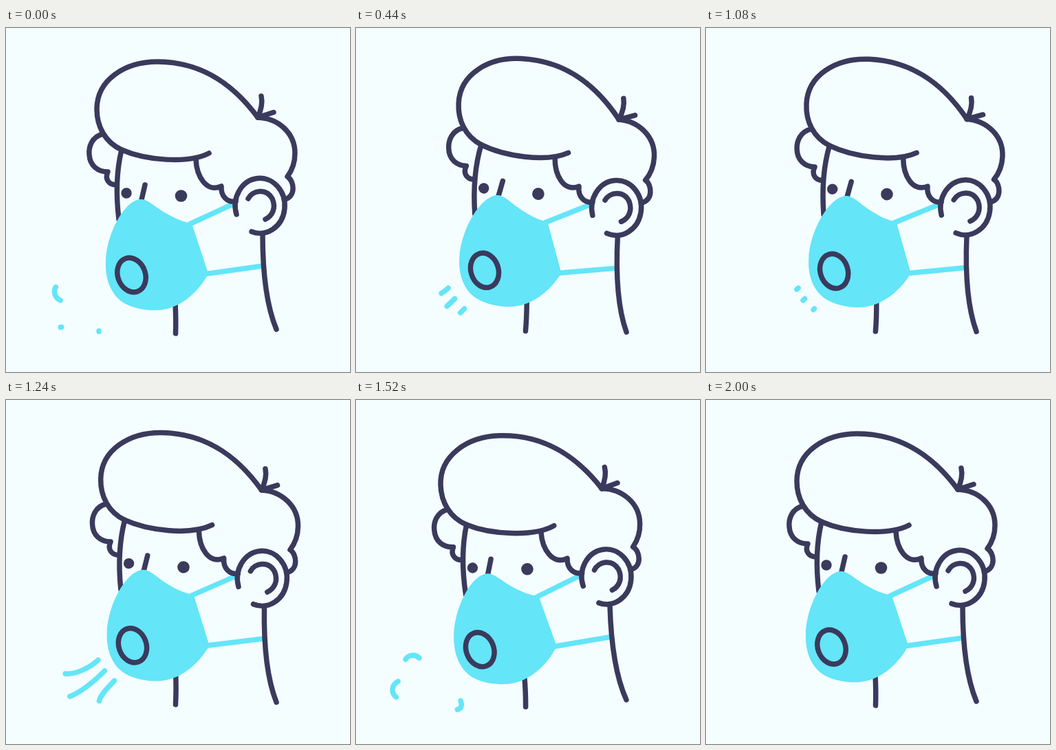
An HTML page that plays this animation: 500 px wide and 500 px high, repeating every 2680 ms.

```html
<!DOCTYPE html>
<html lang="en">
<head>
<meta charset="utf-8">
<title>Breathing in a mask</title>
<style>
  html, body { margin: 0; width: 100%; height: 100%; overflow: hidden; background: #f4fdff; }
  svg { display: block; width: 100%; height: 100%; }
  .ink, .cyan { fill: none; stroke: #3a3a5c; stroke-width: 7.5; stroke-linecap: round; stroke-linejoin: round; }
  .cyan { stroke: #64e5f8; }
</style>
</head>
<body>
<svg viewBox="0 0 500 500">
  <g id="head">
    <path class="cyan" d="M267 285L333 254.5M290 357.5L372 346"/>
    <g class="ink">
      <path d="M168 177C160 210 160 245 164 278"/>
      <path d="M202 228L196 254"/>
      <path d="M246 400C247 420 247 430 246.5 444"/>
      <path d="M373 300C373 350 378 402 393 438"/>
    </g>
    <path fill="#64e5f8" d="M194.500 249C204 248 212 256 224 264C241 275 254 281 270 284L294 357C285 375 262 403 230 409C215 412 190 410 172 400C150 387 144 360 145 340C146 300 171 252 194.500 249Z"/>
    <g class="ink">
      <ellipse cx="182.500" cy="359" rx="20" ry="25.500" transform="rotate(-20 182.500 359)"/>
      <path d="M295 182C264 198 202 192 168 177C144 166 132 143 132 118C132 76 172 49 220 49C290 49 335 88 366 130"/>
      <path d="M371 99Q374 112 366 130L389 122.500"/>
      <path d="M366 130C395 131 420 152 420 182C420 198 415 208 409 216C419 222 422 245 405 249"/>
      <path d="M276 191C277 215 291 240 313 230C312 245 322 254 334 252"/>
      <path d="M141 154C124 158 120 174 121 184C122 200 133 209 148 209C143 220 150 228 160 228"/>
      <path d="M335 271A36 40 0 1 1 357 296"/>
      <path d="M352 248C358 236 378 232 387 248C393 262 387 273 377 278"/>
    </g>
    <g fill="#3a3a5c">
      <ellipse class="eye" cx="175" cy="240" rx="7.7"/>
      <ellipse class="eye" cx="254.500" cy="244" rx="8.8"/>
    </g>
  </g>
  <g class="cyan">
    <path class="air" pathLength="1" d="M134 378C120 391 97 401 82 397C68 393 67 376 78 372C84 370 89 372 92 375"/>
    <path class="air" pathLength="1" d="M143.500 393.500C125 412 100 434 72 436C52 436 47 417 61 409"/>
    <path class="air" pathLength="1" d="M157.500 408C148 418 135 430 135 441C136 452 151 453 153 445C154 442 153 440 152 437"/>
  </g>
</svg>
<script>
const LOOP = 2680, STEP = 40;
const head = document.getElementById('head');
const eyes = document.querySelectorAll('.eye');
const airs = document.querySelectorAll('.air');
const reach = [0.57, 0.6, 0.54]; // where each inhaled stroke begins

// Smooth 0..1 ramp between two times
function ramp(t, from, to) {
  const x = Math.min(1, Math.max(0, (t - from) / (to - from)));
  return x * x * (3 - 2 * x);
}

// Visible part [near, far] of a breath stroke, measured from the mask
function breath(t, i) {
  if (t < 840) {
    const curl = i ? 0 : 0.22 * (1 - ramp(t, 0, 160));
    return [reach[i] * (1 - ramp(t, 0, 400)), reach[i] * (1 - ramp(t, 200, 540)) + curl];
  }
  return [ramp(t, 1232, 1644), ramp(t, 1040, 1440)];
}

function draw(t) {
  const angle = 3 * ramp(t, 0, 430) - 5 * ramp(t, 935, 1640) + 2 * ramp(t, 1640, 2000);
  head.setAttribute('transform', `rotate(${angle} 315 441)`);

  const open = Math.min(1, Math.abs(t - 880) / 80 * 0.9 + 0.04);
  eyes.forEach(eye => eye.setAttribute('ry', eye.getAttribute('rx') * open));

  airs.forEach((air, i) => {
    const [near, far] = breath(t, i);
    air.style.display = far > 0.005 && near < 0.995 ? '' : 'none';
    air.setAttribute('stroke-dasharray', `${Math.max(0.012, far - near)} 3`);
    air.setAttribute('stroke-dashoffset', -near);
  });
}

function tick() {
  const t = performance.now() % LOOP;
  draw(Math.floor(t / STEP) * STEP);
  requestAnimationFrame(tick);
}
tick();
</script>
</body>
</html>
```
